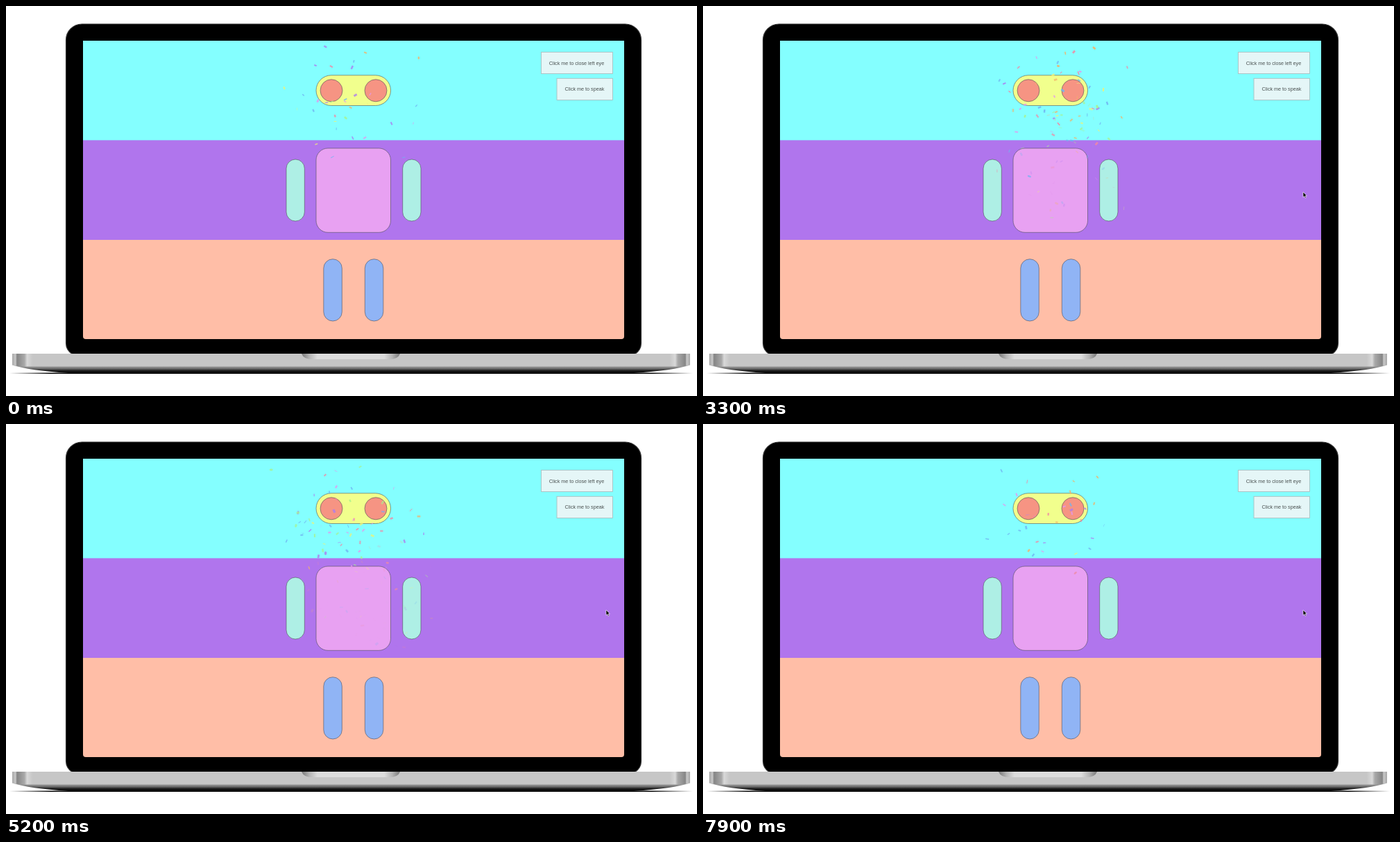
Write an HTML page that moves like this. It is 996 px wide and 562 px high and loops after 8000 ms.

```html
<!DOCTYPE html>
<html lang="en">
<head>
<meta charset="utf-8">
<title>Confetti robot</title>
<style>
  html, body { margin: 0; width: 100%; height: 100%; overflow: hidden; background: #fff; }
  svg { display: block; width: 100vw; height: 100vh; }
  text { font: 7.19px "Liberation Sans", Arial, sans-serif; fill: #4a5050; }
  .robot { stroke: #50505a; stroke-width: .6; }
  .button rect { fill: #e5f6f7; stroke: #a9bfc0; stroke-width: .9; }
</style>
</head>
<body>
<svg viewBox="0 0 996 562" xmlns="http://www.w3.org/2000/svg">
  <defs>
    <clipPath id="screen"><path d="M111 50H891V476q0 4-4 4H115q-4 0-4-4Z"/></clipPath>
    <linearGradient id="metal">
      <stop offset="0" stop-color="#a8a8a8"/>
      <stop offset=".005" stop-color="#c9c9c9"/>
      <stop offset=".007" stop-color="#858585"/>
      <stop offset=".018" stop-color="#a9a9a9"/>
      <stop offset=".022" stop-color="#d8d8d8"/>
      <stop offset=".03" stop-color="#c6c6c6"/>
      <stop offset=".97" stop-color="#c6c6c6"/>
      <stop offset=".978" stop-color="#d8d8d8"/>
      <stop offset=".982" stop-color="#a9a9a9"/>
      <stop offset=".993" stop-color="#858585"/>
      <stop offset=".995" stop-color="#c9c9c9"/>
      <stop offset="1" stop-color="#a8a8a8"/>
    </linearGradient>
    <linearGradient id="under" x2="0" y2="1">
      <stop offset=".1" stop-color="#a4a4a4"/>
      <stop offset=".4" stop-color="#777"/>
      <stop offset=".75" stop-color="#111"/>
    </linearGradient>
    <linearGradient id="notch">
      <stop offset="0" stop-color="#777"/>
      <stop offset=".08" stop-color="#b5b5b5"/>
      <stop offset=".16" stop-color="#dcdcdc"/>
      <stop offset=".84" stop-color="#dcdcdc"/>
      <stop offset=".92" stop-color="#b5b5b5"/>
      <stop offset="1" stop-color="#777"/>
    </linearGradient>
    <linearGradient id="shadow">
      <stop offset="0" stop-color="#000" stop-opacity="0"/>
      <stop offset=".06" stop-color="#000"/>
      <stop offset=".94" stop-color="#000"/>
      <stop offset="1" stop-color="#000" stop-opacity="0"/>
    </linearGradient>
  </defs>

  <path d="M86.500 49A23 23 0 0 1 109.500 26H892.500A23 23 0 0 1 915.500 49V486Q915.500 496 906 502H96Q86.500 496 86.500 486Z" stroke="#333" stroke-width="1.200"/>
  <rect x="5" y="528.500" width="985" height="1.500" fill="url(#shadow)"/>
  <path d="M9 517.500H986Q962 525 905 529H90Q33 525 9 517.500Z" fill="url(#under)"/>
  <path d="M9 501H986V517.500L975 519.500H20L9 517.500Z" fill="url(#metal)"/>
  <path d="M426 501H568Q565 509 553 509H441Q429 509 426 501Z" fill="url(#notch)"/>

  <g clip-path="url(#screen)">
    <rect x="111" y="50" width="780" height="144" fill="#84ffff"/>
    <rect x="111" y="193.400" width="780" height="144" fill="#b075ed"/>
    <rect x="111" y="337" width="780" height="143" fill="#ffbea7"/>
    <g class="robot">
      <rect x="447" y="99.800" width="107.500" height="43.700" rx="21.850" fill="#f1ff8d"/>
      <circle cx="469" cy="121.800" r="16" fill="#f69483"/>
      <circle cx="533" cy="121.800" r="16" fill="#f69483"/>
      <rect x="447" y="205" width="107.500" height="121.300" rx="17" fill="#e8a1f2"/>
      <g fill="#aeefe5">
        <rect x="404" y="221" width="26.300" height="89" rx="13.150"/>
        <rect x="571.700" y="221" width="26.300" height="89" rx="13.150"/>
      </g>
      <g fill="#90b4f5">
        <rect x="457.800" y="364.700" width="26.500" height="89.300" rx="13.250"/>
        <rect x="517.300" y="364.700" width="26.500" height="89.300" rx="13.250"/>
      </g>
    </g>
    <g class="button">
      <rect x="771.400" y="66.500" width="103" height="31"/>
      <text x="782.700" y="84.500">Click me to close left eye</text>
      <rect x="794" y="104.300" width="80.400" height="31.200"/>
      <text x="805.500" y="122.300">Click me to speak</text>
    </g>
    <g id="confetti"></g>
    <path id="cursor" d="M0 0V7.600L1.800 6 3 8.800 4.300 8.200 3.100 5.500H5.400Z" fill="#000" stroke="#fff" stroke-width=".6"/>
  </g>
</svg>
<script>
const LOOP = 8000, STEP = 100;
const BURSTS = [-.6, 1.3, 2.45, 2.9, 4.3, 4.55, 7.25]; // start times in seconds
const PER_BURST = 32, LIFE = 2.8, DRAG = 6, FALL = 62;
const MOUTH = { x: 503, y: 118 };
const TINTS = ['#ad7cf0', '#f08aa5', '#f3b268', '#eff277', '#e497ee', '#70b4f2', '#a9f28c'];
const CURSOR_KEYS = [
  { t: .25, x: 892, y: 246 },
  { t: .9, x: 836, y: 262 },
  { t: 1.7, x: 768, y: 274 },
  { t: 2.1, x: 768, y: 274 },
  { t: 2.6, x: 865, y: 268 }
];

let seed = 17;
const random = () => (seed = seed * 16807 % 2147483647) / 2147483647;
const jitter = size => (random() + random() - 1) * size;
const mix = (a, b, k) => a + (b - a) * k;

const layer = document.getElementById('confetti');
const cursor = document.getElementById('cursor');

function makePiece(start) {
  const node = document.createElementNS('http://www.w3.org/2000/svg', 'rect');
  const w = 3.5 + random() * 1.8, h = w * (.45 + random() * .25);
  const fill = TINTS[Math.floor(random() * TINTS.length)];
  const attrs = { x: -w / 2, y: -h / 2, width: w, height: h, rx: random() < .4 ? h / 2 : 0, fill };
  for (const name in attrs) node.setAttribute(name, attrs[name]);
  layer.append(node);
  return {
    node, start,
    dx: jitter(125), dy: -15 + jitter(110),
    turn: random() * 360, spin: jitter(300),
    wobble: random() * 6.28, flip: 3 + random() * 5
  };
}

const pieces = BURSTS.flatMap(start => Array.from({ length: PER_BURST }, () => makePiece(start)));

// A fast launch slowed by drag, then a steady fall while fading.
function drawPiece(p, t) {
  const age = t - p.start;
  const alive = age >= 0 && age < LIFE;
  p.node.style.display = alive ? '' : 'none';
  if (!alive) return;
  const spread = 1 - Math.exp(-DRAG * age);
  const x = MOUTH.x + p.dx * spread;
  const y = MOUTH.y + p.dy * spread + FALL * age;
  const tilt = .25 + .75 * Math.abs(Math.cos(p.wobble + p.flip * age));
  p.node.setAttribute('transform', `translate(${x} ${y}) rotate(${p.turn + p.spin * age}) scale(1 ${tilt})`);
  p.node.setAttribute('opacity', 1 - age / LIFE);
}

function drawCursor(t) {
  const visible = t >= CURSOR_KEYS[0].t;
  cursor.style.display = visible ? '' : 'none';
  if (!visible) return;
  const to = CURSOR_KEYS.find(key => key.t > t) || CURSOR_KEYS.at(-1);
  const from = CURSOR_KEYS.findLast(key => key.t <= t);
  const k = to === from ? 0 : (t - from.t) / (to.t - from.t);
  const ease = k * k * (3 - 2 * k);
  cursor.setAttribute('transform', `translate(${mix(from.x, to.x, ease)} ${mix(from.y, to.y, ease)})`);
}

function render(ms) {
  const t = Math.floor(ms % LOOP / STEP) * STEP / 1000;
  pieces.forEach(p => drawPiece(p, t));
  drawCursor(t);
}

const begin = performance.now();
function tick() {
  render(performance.now() - begin);
  requestAnimationFrame(tick);
}
tick();
</script>
</body>
</html>
```
